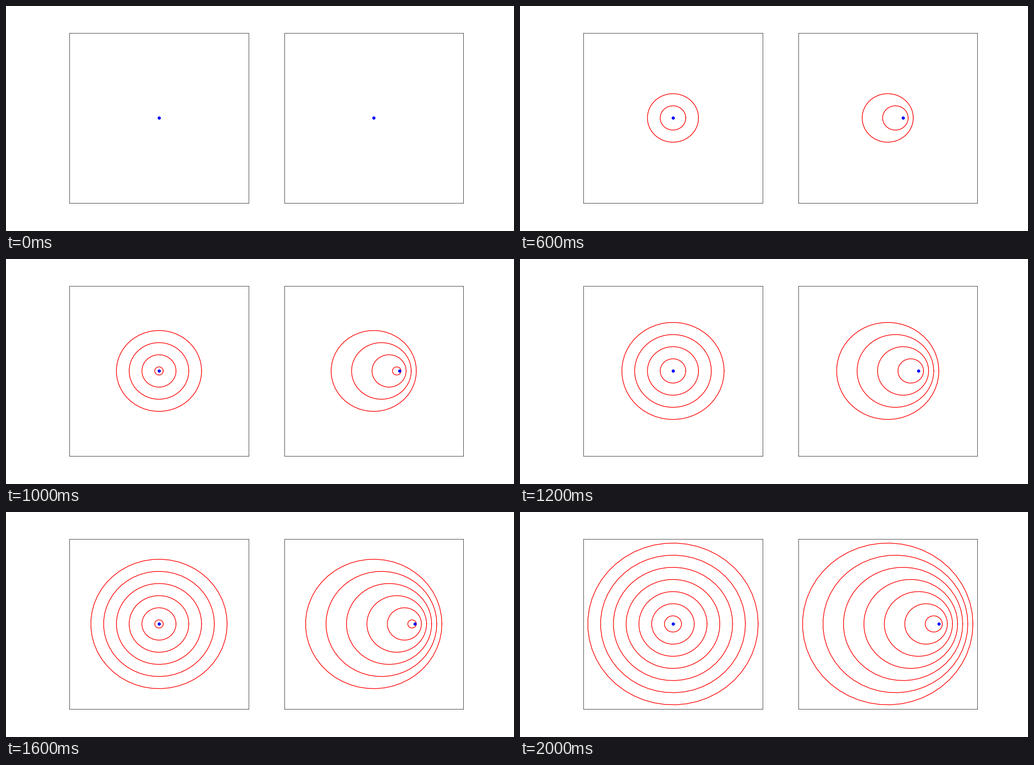
A matplotlib script that plays this animation: 1122x499 px, repeating every 2.1 s.

```python
import matplotlib.pyplot as plt
import numpy as np
from matplotlib.animation import FuncAnimation

WIDTH, HEIGHT, DPI = 1122, 499, 72
FRAMES, INTERVAL = 21, 100
WAVE_STEP = 0.5           # growth of each wavefront per frame
PERIOD = 3                # frames between emissions
SPEEDS = (0.0, 0.6)       # source speed relative to the wave speed
LIMIT = 10.5

angle = np.linspace(0, 2 * np.pi, 50)

fig, axes = plt.subplots(1, 2, figsize=(WIDTH / DPI, HEIGHT / DPI), dpi=DPI)
fig.subplots_adjust(left=0.125, right=0.9, bottom=0.125, top=0.88, wspace=0.2)


def make_panel(ax):
    ax.set(xlim=(-LIMIT, LIMIT), ylim=(-LIMIT, LIMIT), xticks=[], yticks=[])
    births = range(0, FRAMES, PERIOD)
    waves = [(birth, ax.plot([], [], color="red", lw=1.5)[0]) for birth in births]
    source, = ax.plot([0], [0], "o", color="blue", ms=6)
    return waves, source


panels = [make_panel(ax) for ax in axes]


def update(frame):
    artists = []
    for speed, (waves, source) in zip(SPEEDS, panels):
        for birth, line in waves:
            radius = WAVE_STEP * (frame - birth)
            if radius > 0:
                center = speed * WAVE_STEP * birth
                line.set_data(center + radius * np.cos(angle), radius * np.sin(angle))
            else:
                line.set_data([], [])
            artists.append(line)
        source.set_data([speed * WAVE_STEP * frame], [0])
        artists.append(source)
    return artists


anim = FuncAnimation(fig, update, frames=FRAMES, interval=INTERVAL, repeat=True,
                     repeat_delay=0, blit=False)
plt.show()
```
